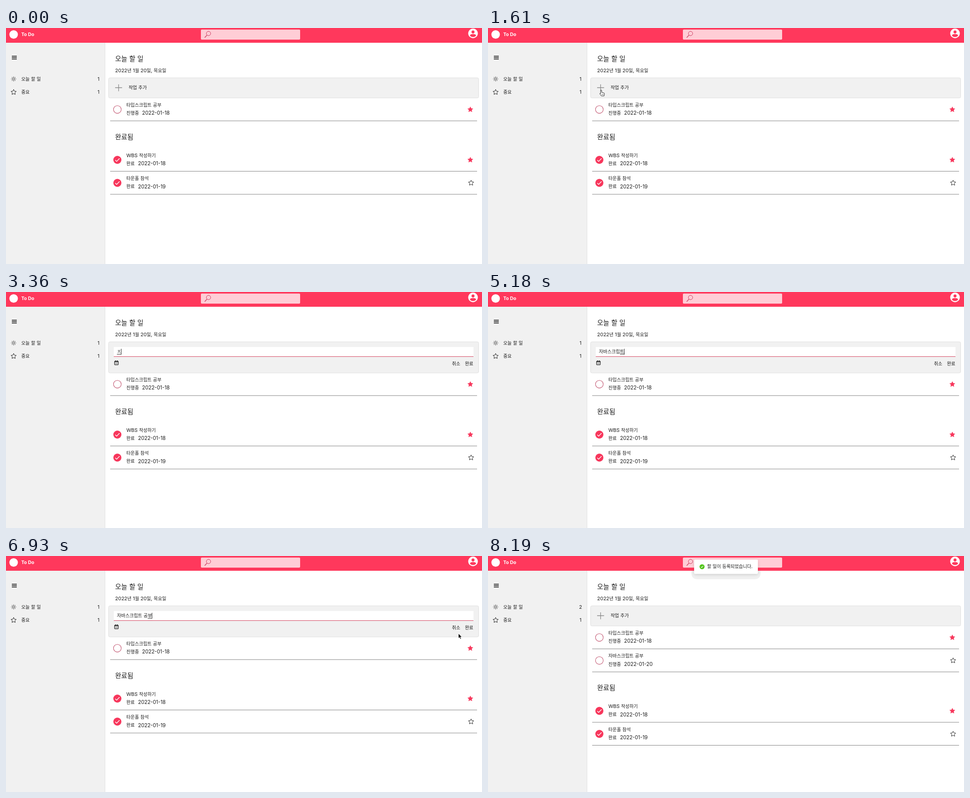
An HTML page that plays this animation: 1060 px wide and 528 px high, repeating every 8750 ms.

```html
<!DOCTYPE html>
<html lang="ko">
<head>
<meta charset="utf-8">
<title>To Do</title>
<style>
html, body { margin: 0; width: 100%; height: 100%; overflow: hidden; background: #fff }
svg { display: block; width: 100vw; height: 100vh }
text { font: 11px Inter, "Noto Sans CJK KR", sans-serif; fill: #1c1c1c; white-space: pre }
.ko { font-family: "Noto Sans CJK KR", "Noto Sans CJK", sans-serif; font-size: .927em }
.toast { filter: drop-shadow(0 2px 3px #0002) }
</style>
</head>
<body>
<svg id="stage" viewBox="0 0 1060 528"></svg>
<script>
const LOOP = 8750, STEP = 70, OPEN = 2100, DONE = 7560, BLINK = 490;
const RED = '#ff385c', MARK = '#f7375c', GREY = '#f1f1f1';
const stage = document.getElementById('stage');

// Times at which the text of the input changes
const keys = [
  [2800, ''], [3360, 'ㅈ'], [3850, '자'], [3990, '잡'], [4060, '자바'], [4200, '자밧'],
  [4410, '자바스'], [4550, '자바슼'], [4620, '자바스크'], [4760, '자바스클'],
  [4830, '자바스크리'], [4900, '자바스크립'], [5110, '자바스크립ㅌ'], [5180, '자바스크립트'],
  [5320, '자바스크립트 '], [5390, '자바스크립트 ㄱ'], [5530, '자바스크립트 고'],
  [5600, '자바스크립트 공'], [5740, '자바스크립트 공ㅂ'], [5810, '자바스크립트 공부']
];

// Pointer path: time, x, y
const path = [
  [70, 1036, 420], [560, 252, 123], [630, 252, 123], [1050, 252, 136], [1190, 252, 136],
  [1260, 252, 139], [2380, 252, 139], [2590, 279, 139], [2660, 279, 139], [2800, 283, 135],
  [6230, 283, 135], [6580, 460, 202], [6930, 1007.5, 173.5], [7140, 1026, 163],
  [7350, 1032.5, 165], [7630, 1032.5, 162], [8120, 1064, 530]
];
const clicks = [[1470, 1610], [2730, 2800], [7490, 7560]];

const rect = (x, y, w, h, fill, more = '') =>
  `<rect x="${x}" y="${y}" width="${w}" height="${h}" fill="${fill}" ${more}/>`;
const circle = (x, y, r, fill, more = '') =>
  `<circle cx="${x}" cy="${y}" r="${r}" fill="${fill}" ${more}/>`;
const line = (d, color, w = 1, more = '') =>
  `<path d="${d}" fill="none" stroke="${color}" stroke-width="${w}" ${more}/>`;
// y is the middle of the line of text
const text = (x, y, s, size = 11, more = '') =>
  `<text x="${x}" y="${y + size * .36}" style="font-size:${size}px;${more}">` +
  s.replace(/[ㄱ-ㅎ가-힣]+/g, m => `<tspan class="ko">${m}</tspan>`) + '</text>';
const move = (x, y, body, more = '') => `<g transform="translate(${x} ${y})" ${more}>${body}</g>`;

function star(x, y, full) {
  const pts = Array.from({ length: 10 }, (_, i) => {
    const a = (i / 5 - .5) * Math.PI, r = i % 2 ? 3 : 6.2;
    return (x + r * Math.cos(a)).toFixed(2) + ',' + (y + r * Math.sin(a)).toFixed(2);
  });
  return `<polygon points="${pts.join(' ')}" fill="${full ? MARK : 'none'}"
    stroke="${full ? MARK : '#222'}" stroke-width="${full ? .6 : 1}" stroke-linejoin="round"/>`;
}

function sun(x, y) {
  let s = circle(x, y, 2.4, 'none', 'stroke="#222"');
  for (let a = 0; a < 360; a += 45)
    s += line(`M${x} ${y - 4}v-1.5`, '#222', 1, `transform="rotate(${a} ${x} ${y})"`);
  return s;
}

const frame = rect(0, 0, 1060, 528, '#fff') + rect(0, 33, 220, 495, GREY) +
  line('M220.5 33V528', '#e2e2e2') + rect(0, 0, 1060, 33, RED) +
  circle(17, 14.5, 9.5, '#fff') +
  text(34, 14.5, 'To Do', 10.4, 'font-weight:700;fill:#fff') +
  rect(434, 3.5, 221, 22.5, '#ffcdd6', 'rx="2"') +
  circle(451, 12.3, 4.8, 'none', 'stroke="#c9355a"') + line('M447.5 16L442.5 21.5', '#c9355a', 1.2) +
  circle(1040, 12, 10.7, '#fff') + circle(1040, 8.8, 3.4, RED) +
  `<path d="M1033.2 17q0-3.6 6.8-3.6t6.8 3.6q-2.6 3.2-6.8 3.2t-6.8-3.2z" fill="${RED}"/>` +
  line('M13 63h11M13 66.3h11M13 69.5h11', '#111', 1.4) +
  sun(17, 114) + text(34, 114, '오늘 할 일') +
  star(17, 143.7, false) + text(34, 143.3, '중요') +
  text(206, 143.3, '1', 11, 'text-anchor:middle') +
  text(243, 67.8, '오늘 할 일', 15.9) + text(243, 95, '2022년 1월 20일, 목요일');

const box = h => rect(228.5, 111.5, 824, h, GREY, 'rx="3" stroke="#dedede"');
const addBox = box(45) + line('M243 133.5h15.5M250.7 126v15.5', '#868686', 1.3) +
  text(273, 133.5, '작업 추가');
const calendar = rect(241.7, 154.8, 8.4, 8, 'none', 'rx="1" stroke="#222" stroke-width="1.2"') +
  line('M241.7 156h8.4M244 153v2M248 153v2', '#222', 1.4) +
  line('M243.5 158.7h5M243.5 160.7h5', '#222', .9, 'stroke-dasharray="1.1 .8"');
const formBox = box(69.5) + rect(240, 123, 801, 21, '#fff') +
  line('M240 144.5H1041', '#d4405c') + calendar +
  text(993, 160, '취소') + text(1022, 160, '완료');

function typing(t) {
  const key = keys.filter(k => k[0] <= t).pop();
  if (!key) return '';
  const [since, s] = key;
  const end = 247 + [...s].reduce((w, c) => w + (c === ' ' ? 2.9 : 9.38), 0);
  let out = text(247, 133.5, s);
  if (s && !s.endsWith(' ') ) out += line(`M${end - 9.4} 139.2H${end}`, '#222');
  if (Math.floor((t - since) / BLINK) % 2 === 0) out += line(`M${end + .2} 127V140`, '#222');
  return out;
}

// y is the middle of the row
function row({ y, title, date, done, starred }, hover) {
  const mark = done
    ? circle(248, y, 9, MARK) + line(`M243.3 ${y + .4}l3.2 3.2 6.3-6.8`, '#fff', 1.4)
    : circle(248, y, 8.6, 'none', 'stroke="#c0506c" stroke-width="1.1"');
  return (hover ? rect(232, y - 25.5, 817, 51, GREY) : '') + mark +
    text(268, y - 10.3, title) + text(268, y + 8, done ? '완료' : '진행중') +
    text(done ? 294 : 303, y + 8, date, 11.3) +
    star(starred ? 1034 : 1035.7, y + .2, starred) +
    line(`M232 ${y + 25.5}H1049`, '#808080');
}

function pointerAt(t) {
  if (t < 70 || t >= 3290 && t < 6300 || t >= 8120) return null;
  const i = path.findIndex(p => p[0] > t);
  const [t0, x0, y0] = path[i - 1], [t1, x1, y1] = path[i];
  let u = (t - t0) / (t1 - t0);
  u = u * u * (3 - 2 * u);
  return { x: x0 + (x1 - x0) * u, y: y0 + (y1 - y0) * u };
}

const shapes = {
  arrow: '<path d="M0 0V10.6l2.4-2.2 1.8 4 1.9-.8-1.8-3.8h3.4z" fill="#000" stroke="#fff" stroke-width=".8"/>',
  hand: '<path d="M-1.2 1a1.2 1.2 0 0 1 2.4 0V5l4.4 1q2 .6 1.7 2.6l-.8 4.4h-6L-3 8.4q-.3-1.9 1.3-1l.5.6z" ' +
    'fill="#fff" stroke="#111" stroke-width=".9"/>' + line('M1.5 8.5v2.2M3.3 8.5v2.2M5 8.5v2.2', '#333', .7),
  beam: line('M-3-7.5Q0-7.5 0-5.5Q0-7.5 3-7.5M0-5.5V5.5M-3 7.5Q0 7.5 0 5.5Q0 7.5 3 7.5', '#222')
};

function pointer(p, t, open, overRow) {
  const inside = (x0, y0, x1, y1) => p.x > x0 && p.x < x1 && p.y > y0 && p.y < y1;
  const kind = open && inside(240, 123, 1041, 145) ? 'beam'
    : overRow || (open ? inside(1018, 150, 1045, 170) : inside(228, 111, 1052, 157)) ? 'hand' : 'arrow';
  const pressed = clicks.some(([a, b]) => t >= a && t < b);
  return move(p.x, p.y, (pressed ? circle(0, 0, 15.5, 'none', 'stroke="#000" stroke-opacity=".5" stroke-width="2"') : '') +
    shapes[kind]);
}

function toast(t) {
  const u = Math.min(1, (t - DONE) / 300), ease = 1 - (1 - u) ** 7;
  const dy = -48 * (1 - ease);
  const shade = Math.max(0, 52 + dy - 33);
  return `<g opacity="${ease}">` +
    `<path d="M453 33h154v${Math.max(0, shade - 14)}q0 ${Math.min(14, shade)}-14 ${Math.min(14, shade)}h-126q-14 0-14-${Math.min(14, shade)}z" fill="#f0f0f0"/>` +
    move(0, dy, rect(459, 8, 142, 32, '#fff', 'rx="2" class="toast"') +
      circle(476.7, 24, 5.6, '#52c41a') + line('M474.2 24.2l1.8 1.8 3.1-3.8', '#fff', 1.1) +
      text(488, 23.5, '할 일이 등록되었습니다.', 10.8)) + '</g>';
}

function scene(t) {
  const open = t >= OPEN && t < DONE, added = t >= DONE;
  const top = open ? 24 : 0, low = top + (added ? 51.5 : 0);
  const rows = [
    { y: 182.3 + top, title: '타입스크립트 공부', date: '2022-01-18', starred: true },
    { y: 295 + low, title: 'WBS 작성하기', date: '2022-01-18', done: true, starred: true },
    { y: 346.5 + low, title: '타운홀 참석', date: '2022-01-19', done: true }
  ];
  if (added) rows.push({ y: 233.8, title: '자바스크립트 공부', date: '2022-01-20' });
  const p = pointerAt(t);
  const over = p && rows.find(r => Math.abs(p.y - r.y) < 25.7 && p.x > 232 && p.x < 1049);
  return frame + text(206, 114, added ? '2' : '1', 11, 'text-anchor:middle') +
    rows.map(r => row(r, r === over)).join('') + text(243, 242.8 + low, '완료됨', 15.9) +
    (open ? formBox + typing(t) : addBox) +
    (added ? toast(t) : '') + (p ? pointer(p, t, open, over) : '');
}

let shown = -1;
function tick() {
  const t = Math.floor(performance.now() % LOOP / STEP) * STEP;
  if (t !== shown) stage.innerHTML = scene(shown = t);
  requestAnimationFrame(tick);
}
tick();
</script>
</body>
</html>
```
